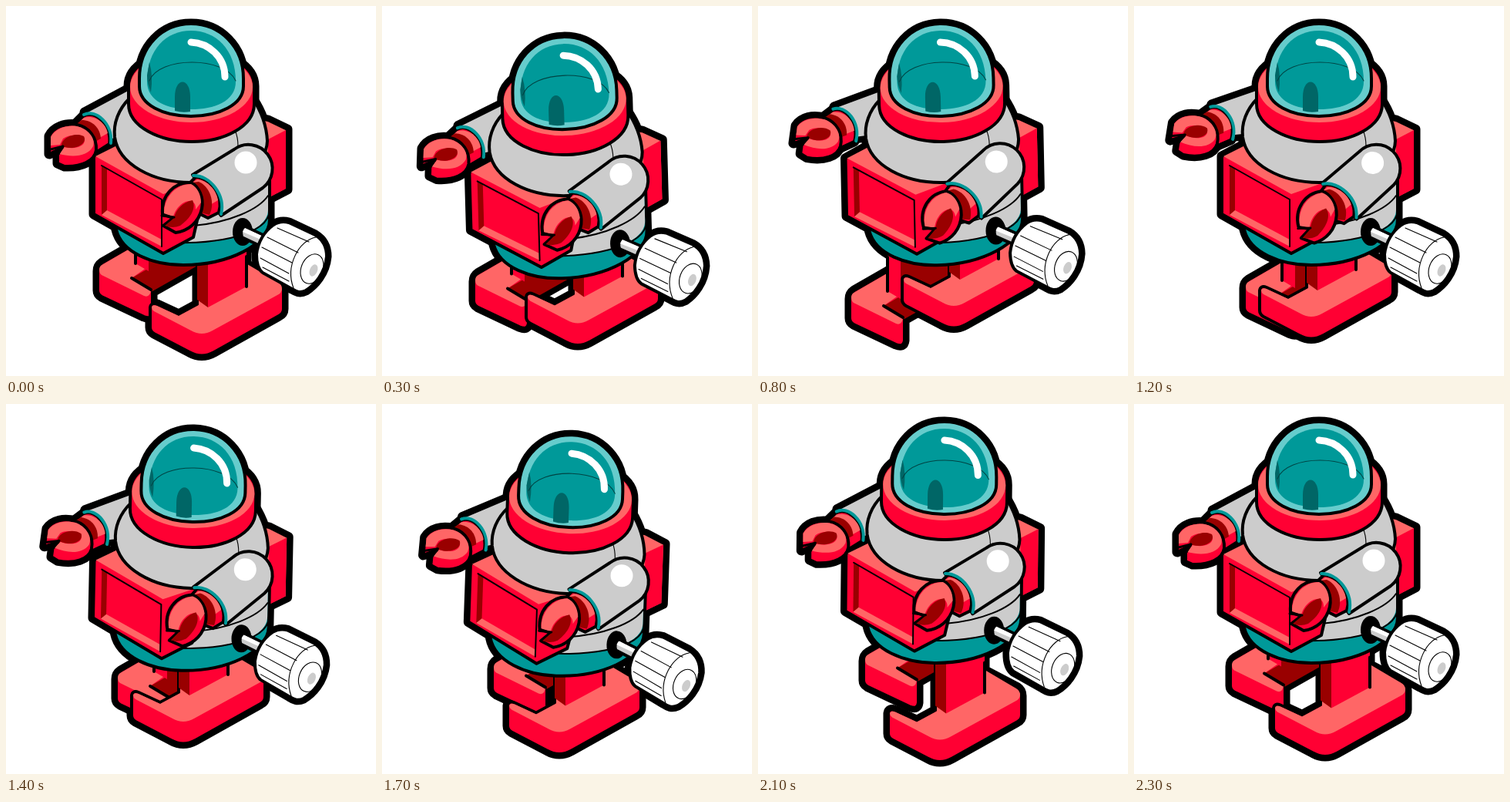
Recreate the animation shown at these times as an HTML page. Size 480 by 480 pixels, loop 2400 ms.

```html
<!DOCTYPE html>
<html lang="en">
<head>
<meta charset="utf-8">
<title>Wind-up robot</title>
<style>
html, body { margin: 0; width: 100%; height: 100%; overflow: hidden; background: #fff; }
svg { display: block; width: 100vw; height: 100vh; }
path, ellipse, circle { stroke-linejoin: round; stroke-linecap: round; }
.edge { stroke: #000; stroke-width: var(--line, 4); }
.halo { --line: 13; }
.red { fill: #f03; } .pink { fill: #f66; } .dark { fill: #900; }
.grey { fill: #ccc; } .teal { fill: #099; } .aqua { fill: #6cc; }
.deep { fill: #066; } .white { fill: #fff; }
.line { fill: none; stroke: #000; stroke-width: 4; }
.fine { fill: none; stroke: #000; stroke-width: 2; }
.thin { fill: none; stroke: #000; stroke-width: 1.1; }
.cuff { fill: none; stroke: #099; stroke-width: 4; }
</style>
</head>
<body>
<svg viewBox="0 0 480 480">
<use href="#robot" class="halo"/>
<g id="robot">
  <g id="leftFoot">
    <path class="edge red" d="M119 344Q119 337 125 333L200 290H250V337L190 371V398Q189 407 179 403L124 377Q119 374 119 369Z"/>
    <path class="pink" d="M121 342Q121 337 126 335L200 292H250L163 353 188 368Q187 379 179 376L124 349Q121 347 121 342Z"/>
    <path class="dark" d="M163 353L250 303V336L190 370 188 368Z"/>
    <path class="red" d="M168 260V334L185 344V260Z"/>
    <path class="dark" d="M185 260V342L250 304V260Z"/>
    <path class="line" d="M168 290V334M163 353L188 368"/>
  </g>
  <g id="rightFoot">
    <path class="edge red" d="M187 391Q188 384 196 387L224 400 248 387V300H312V335L354 357Q360 361 360 368V393Q360 399 354 402L270 449Q254 458 238 449L192 425Q187 422 187 417Z"/>
    <path class="pink" d="M189 391Q190 387 196 389L224 402 250 388V332H308L352 358Q358 361 358 367 358 372 352 375L268 421Q254 429 240 421L192 396Q189 394 189 391Z"/>
    <path class="dark" d="M248 300V381L262 391V300Z"/>
    <path class="red" d="M262 300V391L312 364V300Z"/>
    <path class="line" d="M312 325V364"/>
  </g>
  <g id="body">
    <path class="edge pink" d="M325 145L340 148 365 160V238L340 251 325 240Z"/>
    <path class="red" d="M363 161V237L340 249V173Z"/>
    <g id="leftArm">
      <path class="edge grey" d="M102 138L158 108 178 122 160 168 134 175Z"/>
      <path class="edge red" d="M88 155L100 143C116 133 138 157 134 179L112 193Z"/>
      <path class="pink" d="M94 152L101 145C115 141 129 151 132 165L116 174Z"/>
      <path class="dark" d="M89 155L98 148C112 148 122 158 123 172L112 178Z"/>
      <path class="cuff" d="M101 141C116 133 139 153 136 178"/>
      <path class="edge red" d="M56 169C62 157 76 152 92 154 108 157 118 171 117 187 115 201 98 209 76 208L67 204V193L73 184 56 192Z"/>
      <path class="pink" d="M58 170C64 159 78 154 92 156 106 159 117 172 113 182 106 195 88 197 69 192L76 183C88 186 102 183 102 174 100 166 82 166 74 172L70 180 58 181Z"/>
      <path class="dark" d="M72 183C70 171 90 163 101 169 106 178 92 187 76 183Z"/>
      <path class="line" d="M58 186L74 182 68 192" style="stroke-width:3"/>
    </g>
    <path class="edge teal" d="M143 240V290C150 320 190 336 230 336 288 336 342 310 342 277V200H143Z"/>
    <path class="grey" d="M200 240V306C255 311 340 301 340 264V190H200Z"/>
    <path class="fine" d="M203 306C255 311 342 301 342 264"/>
    <path class="fine" d="M243 285C290 281 328 264 340 246"/>
    <path class="edge red" d="M114 195L146 178 260 225 243 300 204 321 114 270Z"/>
    <path class="pink" d="M116 195L146 180 255 226 204 244Z"/>
    <path class="dark" d="M124 207L131 211V266L124 271Z"/>
    <path class="pink" d="M124 271L131 265 202 303V312Z"/>
    <path class="fine" d="M124 207L202 251V312"/>
    <path class="edge grey" d="M160 120C146 134 139 152 141 170 146 205 190 229 240 229 296 229 338 208 339 175 338 155 332 138 320 120Z"/>
    <path class="thin" d="M297 161Q301 170 301 182"/>
    <path class="edge red" d="M159 104V127C159 157 200 176 241 176S322 157 322 127V104C322 78 290 58 241 58S159 78 159 104Z"/>
    <ellipse class="pink" cx="240.500" cy="105" rx="79.500" ry="46"/>
    <path class="edge aqua" d="M173 94C173 52 203 23 240 23S308 52 308 94V104C308 128 276 143 240 143S173 128 173 104Z"/>
    <path class="teal" d="M183 98C183 56 208 32 240 32S298 56 298 98C298 124 270 134 240 134S183 124 183 98Z"/>
    <path class="deep" d="M186 73Q191 90 188 112 183 100 183 90Z"/>
    <path class="deep" d="M219 136V118C219 92 239 92 239 118V137Q229 139 219 136Z"/>
    <path class="thin" d="M186 97C198 65 284 65 298 97" style="stroke:#044"/>
    <path d="M240 47C263 48 284 66 284 92" fill="none" stroke="#fff" stroke-width="9"/>
    <ellipse cx="307" cy="293" rx="13" ry="18"/>
    <path class="edge grey" d="M310 286L340 300V316L306 300Q303 289 310 286Z"/>
    <path class="white" d="M310 288L340 302V307L307 293Z"/>
    <path class="edge white" d="M347 284Q356 278 367 281L401 297Q416 306 416 325C414 347 400 362 389 369 381 373 376 370 371 367L333 346Q325 340 325 322 328 298 347 284Z"/>
    <path class="thin" d="M352 288L393 306M339 300L379 320M332 313L371 333M330 327L367 347M333 339L367 357M402 300C380 304 362 337 373 366"/>
    <ellipse class="thin" cx="397" cy="341" rx="14" ry="20" transform="rotate(22 397 341)"/>
    <ellipse class="grey" cx="399" cy="343" rx="5" ry="8" transform="rotate(22 399 343)"/>
    <g id="rightArm">
      <path class="edge grey" d="M242 219L296 186A31 31 0 0 1 333 236L279 272Z"/>
      <circle class="white" cx="311" cy="203" r="14.500"/>
      <path class="edge red" d="M236 232L246 222C264 222 283 246 276 268L262 275 240 264Z"/>
      <path class="pink" d="M240 230L248 225C261 226 273 238 275 252L258 262Z"/>
      <path class="cuff" d="M243 220C264 219 285 245 279 270"/>
      <path class="dark" d="M241 229L250 228C264 234 272 254 264 271L252 268Z"/>
      <path class="edge red" d="M203 270C201 246 218 228 240 229 250 234 257 248 254 263 250 281 236 292 220 294L204 285 217 275Z"/>
      <path class="pink" d="M205 269C205 247 221 231 240 231 248 235 253 244 253 255L246 264C247 253 238 250 229 256 222 261 219 267 217 273Z"/>
      <path class="dark" d="M206 285L218 275C220 264 230 254 242 252 247 262 240 275 226 285Q216 289 206 285Z"/>
      <path class="line" d="M202 272L218 274" style="stroke-width:3"/>
    </g>
  </g>
</g>
</svg>
<script>
const unit = v => Math.max(0, Math.min(1, v));
const set = (id, value) => document.getElementById(id).setAttribute('transform', value);

function pose(t) {
  const half = t % 1200;
  const side = t < 1200 ? -1 : 1;
  const lift = unit(Math.min(t, 2000 - t) / 800);
  const slide = unit(Math.min(t - 800, 2400 - t) / 400);
  const sink = 20 * Math.sin(Math.PI * Math.min(half, 800) / 800) ** 2;
  const tilt = 2 * side * Math.sin(Math.PI * Math.min(half, 1000) / 1000);
  const x = 24 * slide, y = 36 * lift - 14 * slide;

  set('leftFoot', `translate(${x} ${y})`);
  set('rightFoot', `translate(${-x} ${-y})`);
  set('body', `translate(0 ${sink}) rotate(${tilt} 240 220)`);
  set('leftArm', `rotate(${9 * lift} 165 125)`);
  set('rightArm', `rotate(${-9 * lift} 313 212)`);
}

// The toy moves in steps of a tenth of a second.
const start = performance.now();
function tick() {
  pose(Math.floor((performance.now() - start) / 100) % 24 * 100);
  requestAnimationFrame(tick);
}
tick();
</script>
</body>
</html>
```
